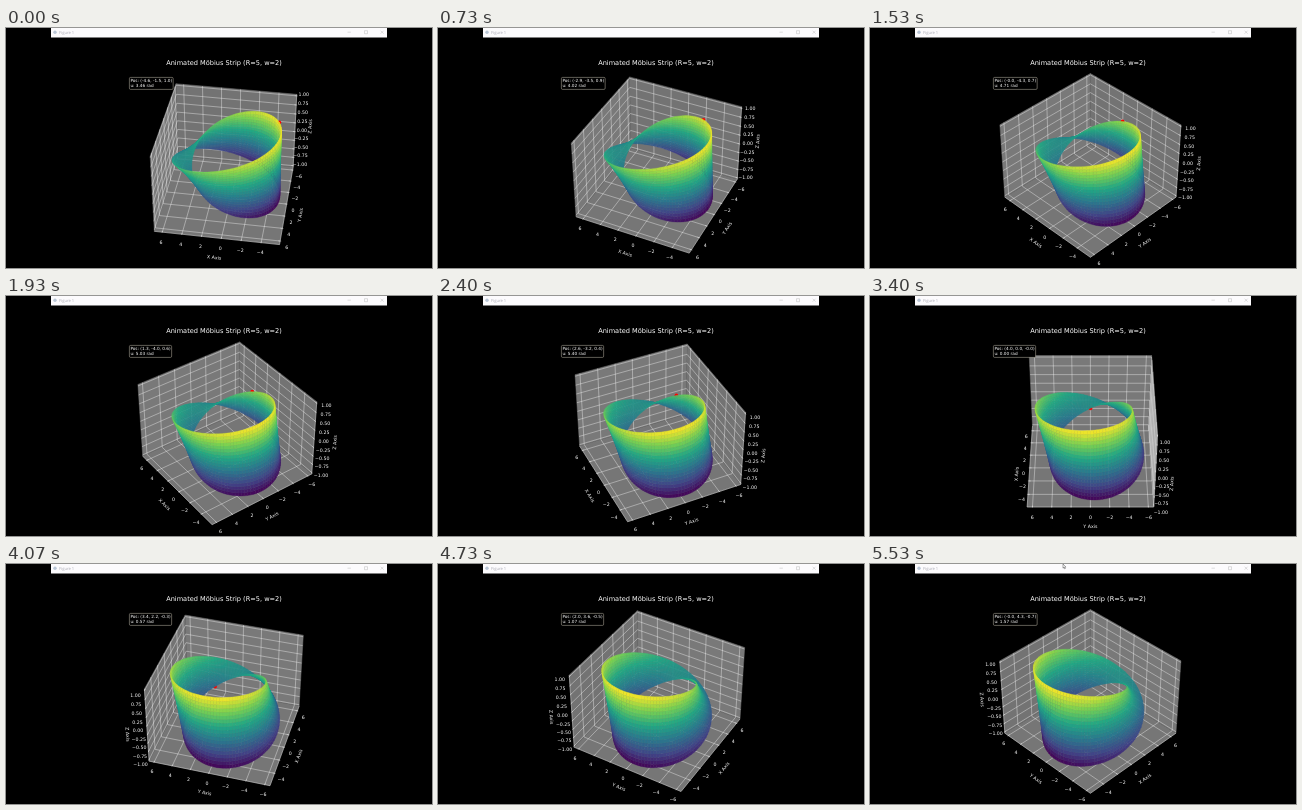
Write an HTML page with a canvas that moves like this. It is 426 by 240 pixels and loops after 5.59 s.

```html
<!DOCTYPE html>
<html lang="en">
<head>
<meta charset="utf-8">
<title>Animated Möbius Strip</title>
<style>
  html, body { margin: 0; width: 100%; height: 100%; overflow: hidden; background: #000; }
  canvas, svg { position: absolute; left: 0; top: 0; width: 426px; height: 240px; display: block; }
  text { text-rendering: geometricPrecision; }
  .title { font: 6.6px "DejaVu Sans", sans-serif; fill: #fff; text-anchor: middle; }
  .caption { font: 4.1px "Open Sans", sans-serif; fill: #a9a9b4; }
  .buttons { fill: none; stroke: #aaa; stroke-width: .4; }
</style>
</head>
<body>
<canvas id="plot"></canvas>
<svg viewBox="0 0 426 240">
  <rect x="45" width="336" height="9.5" fill="#fcfbfd"/>
  <circle cx="49" cy="4.2" r="1.7" fill="#b9c6d6"/>
  <text class="caption" x="53" y="5.8">Figure 1</text>
  <path class="buttons" d="M341.5 4.2h3.4 M358.5 2.7h3v3h-3z M374.6 2.7l3 3 M377.6 2.7l-3 3"/>
  <text class="title" x="218" y="36.9">Animated Möbius Strip (R=5, w=2)</text>
  <path id="cursor" visibility="hidden" d="M193 0v4.2l1-.9.7 1.5.6-.3-.7-1.4h1.3z" fill="#fff" stroke="#222" stroke-width=".4"/>
</svg>
<script>
const LOOP = 5590, STEP = 200 / 3, LAST = 83;
const PT = 0.47;                          // pixels per point
const CX = 220.4, CY = 134, SCALE = 1045, DIST = 10;
const LABEL_DROP = 1.5;
const FONT = '"DejaVu Sans", sans-serif';
const RAD = Math.PI / 180;

const SIZE = [1.1429, 1.1429, 0.8571];    // box size in view units
const HALF = SIZE.map(s => s * 25 / 48);  // panes reach slightly past the limits
const MID = [0.4875, 0, 0];
const SPAN = [12.13, 12.58, 2];
const PER_POINT = 48 * PT / (2 * 195) / 12;
const TICK_PUSH = 11.5 * PER_POINT, NAME_PUSH = 25 * PER_POINT;

const range = (from, to, step) =>
  Array.from({ length: Math.round((to - from) / step) + 1 }, (_, i) => from + i * step);
const AXES = [
  { name: 'X Axis', ticks: range(-4, 6, 2), digits: 0, tickDir: 1 },
  { name: 'Y Axis', ticks: range(-6, 6, 2), digits: 0, tickDir: 0 },
  { name: 'Z Axis', ticks: range(-1, 1, 0.25), digits: 2, tickDir: 0 }
];
const PANES = [121, 115, 118];
const VIRIDIS = [[68, 1, 84], [65, 68, 135], [42, 120, 142], [34, 168, 132], [122, 209, 81], [253, 231, 37]];

// Recorded playback is uneven: [picture, step of the animation]
const PACE = [[0, 55], [11, 64], [23, 75], [36, 86], [51, 100], [71, 117], [83, 125]];

const canvas = document.getElementById('plot');
const cursor = document.getElementById('cursor');
const ctx = canvas.getContext('2d');
const dpr = window.devicePixelRatio || 1;
canvas.width = 426 * dpr;
canvas.height = 240 * dpr;

const toBox = (v, i) => (v - MID[i]) / SPAN[i] * SIZE[i];

function mobius(u, v) {
  const r = 5 + v * Math.cos(u / 2);
  return [r * Math.cos(u), r * Math.sin(u), v * Math.sin(u / 2)];
}

function viridis(t) {
  const x = Math.max(0, Math.min(0.9999, t)) * (VIRIDIS.length - 1);
  const i = Math.floor(x), f = x - i;
  return `rgb(${VIRIDIS[i].map((c, n) => Math.round(c + (VIRIDIS[i + 1][n] - c) * f))})`;
}

const NU = 100, NV = 20;
const mesh = range(0, NU, 1).map(i =>
  range(0, NV, 1).map(j => mobius(i / NU * 2 * Math.PI, j / NV * 2 - 1)));

function camera(azim, elev) {
  const ca = Math.cos(azim), sa = Math.sin(azim);
  const ce = Math.cos(elev), se = Math.sin(elev);
  const project = ([x, y, z]) => {
    const right = y * ca - x * sa, front = x * ca + y * sa;
    const depth = DIST - front * ce - z * se;
    return [CX + SCALE * right / depth, CY - SCALE * (z * ce - front * se) / depth, depth];
  };
  return { project, near: [ca > 0 ? 1 : -1, sa >= 0 ? 1 : -1, 1] };
}

function trace(points) {
  ctx.beginPath();
  points.forEach(p => ctx.lineTo(p[0], p[1]));
}

function line(points, width) {
  trace(points);
  ctx.lineWidth = width;
  ctx.stroke();
}

function label(text, [x, y], size, angle = 0) {
  ctx.save();
  ctx.translate(x, y + LABEL_DROP);
  ctx.rotate(angle);
  ctx.font = `${size * PT}px ${FONT}`;
  ctx.textAlign = 'center';
  ctx.fillStyle = '#fff';
  ctx.fillText(text, 0, size * PT * 0.365);
  ctx.restore();
}

function drawPanes({ project, near }) {
  const far = [-near[0], -near[1], -1];
  PANES.forEach((gray, i) => {
    const [j, k] = [0, 1, 2].filter(n => n !== i);
    const corners = [[-1, -1], [1, -1], [1, 1], [-1, 1]].map(([a, b]) => {
      const p = [];
      p[i] = far[i] * HALF[i];
      p[j] = a * HALF[j];
      p[k] = b * HALF[k];
      return project(p);
    });
    trace(corners);
    ctx.closePath();
    ctx.fillStyle = ctx.strokeStyle = `rgb(${gray},${gray},${gray})`;
    ctx.fill();
    ctx.lineWidth = PT;
    ctx.stroke();
  });
}

function drawGrid({ project, near }) {
  ctx.strokeStyle = '#fff';
  AXES.forEach((axis, i) => {
    const [j, k] = [0, 1, 2].filter(n => n !== i);
    for (const tick of axis.ticks) {
      const back = near.map((s, n) => -s * HALF[n]);
      back[i] = toBox(tick, i);
      const a = back.slice(), b = back.slice();
      a[j] *= -1;
      b[k] *= -1;
      line([a, back, b].map(project), 0.8 * PT);
    }
  });
}

function drawAxes({ project, near }) {
  const [nx, ny] = near;
  const edges = [[0, ny, -1], [nx, 0, -1], [nx, -ny, 0]];
  ctx.strokeStyle = '#fff';
  AXES.forEach((axis, i) => {
    const at = (value, push) => edges[i].map((s, n) =>
      n === i ? value : s * (HALF[n] + push * SIZE[n]));
    const from = project(at(-HALF[i], 0)), to = project(at(HALF[i], 0));
    line([from, to], 0.8 * PT);

    for (const tick of axis.ticks) {
      const pos = toBox(tick, i), d = axis.tickDir;
      const mark = [0.1, -0.2].map(len => {
        const p = at(pos, 0);
        p[d] += edges[i][d] * len * SIZE[d] / 12;
        return project(p);
      });
      line(mark, 0.8 * PT);
      label(tick.toFixed(axis.digits).replace('-', '−'), project(at(pos, TICK_PUSH)), 10);
    }

    let angle = Math.atan2(from[1] - to[1], to[0] - from[0]) / RAD;
    angle = (angle + 360) % 180;
    if (angle > 90) angle -= 180;
    label(axis.name, project(at(0, NAME_PUSH)), 10, -angle * RAD);
  });
}

function drawStrip({ project }) {
  const pts = mesh.map(row => row.map(p => project(p.map(toBox))));
  const quads = [];
  for (let i = 0; i < NU; i++) {
    for (let j = 0; j < NV; j++) {
      const cell = [[i, j], [i + 1, j], [i + 1, j + 1], [i, j + 1]];
      const corners = cell.map(([a, b]) => pts[a][b]);
      quads.push({
        corners,
        depth: corners.reduce((sum, p) => sum + p[2], 0),
        z: cell.reduce((sum, [a, b]) => sum + mesh[a][b][2], 0) / 4
      });
    }
  }
  quads.sort((a, b) => b.depth - a.depth);
  ctx.lineWidth = 0.3;
  for (const q of quads) {
    trace(q.corners);
    ctx.closePath();
    ctx.fillStyle = ctx.strokeStyle = viridis((q.z + 1) / 2);
    ctx.fill();
    ctx.stroke();
  }
}

function drawDot({ project }, pos) {
  const [x, y] = project(pos.map(toBox));
  ctx.beginPath();
  ctx.arc(x, y, 4 * PT, 0, 2 * Math.PI);
  ctx.fillStyle = '#f00';
  ctx.fill();
}

function drawReadout(pos, u) {
  const fixed = v => (v < 0 ? '-' : '') + Math.abs(v).toFixed(1);
  const text = `Pos: (${pos.map(fixed).join(', ')})`;
  ctx.font = `${9 * PT}px ${FONT}`;
  ctx.textAlign = 'left';
  ctx.beginPath();
  ctx.roundRect(123.4, 49.4, ctx.measureText(text).width + 2, 12, 1.2);
  ctx.fillStyle = '#000';
  ctx.fill();
  ctx.strokeStyle = '#ccc6b4';
  ctx.lineWidth = PT;
  ctx.stroke();
  ctx.fillStyle = '#fff';
  ctx.fillText(text, 124.4, 54.3);
  ctx.fillText(`u: ${u.toFixed(2)} rad`, 124.4, 59.3);
}

function pictureAt(t) {
  const k = Math.min(LAST, Math.floor(t / STEP + 0.1));
  return Math.round(k * STEP / 10) * 10 > t ? k - 1 : k;
}

function stepAt(k) {
  const n = Math.max(1, PACE.findIndex(p => p[0] >= k));
  const [k0, s0] = PACE[n - 1], [k1, s1] = PACE[n];
  return Math.round(s0 + (s1 - s0) * (k - k0) / (k1 - k0));
}

function draw(k) {
  const step = stepAt(k);
  const azim = step * 1.8 * RAD;
  const cam = camera(azim, (30 + 10 * Math.sin(azim / 2)) * RAD);
  // the tiny drift keeps the sign of rounded zeros
  const u = step * Math.PI / 50 + (step - 80) * 1e-9;
  const pos = mobius(u, 1);

  ctx.setTransform(dpr, 0, 0, dpr, 0, 0);
  ctx.textRendering = 'geometricPrecision';
  ctx.lineJoin = 'round';
  ctx.fillStyle = '#000';
  ctx.fillRect(0, 0, 426, 240);
  drawPanes(cam);
  drawGrid(cam);
  drawAxes(cam);
  drawDot(cam, pos);
  drawStrip(cam);
  drawReadout(pos, u % (2 * Math.PI));
  cursor.setAttribute('visibility', k >= LAST - 1 ? 'visible' : 'hidden');
}

const start = performance.now();
let shown = -1;
function tick() {
  const k = pictureAt((performance.now() - start) % LOOP);
  if (k !== shown) draw(shown = k);
  requestAnimationFrame(tick);
}
tick();
</script>
</body>
</html>
```
